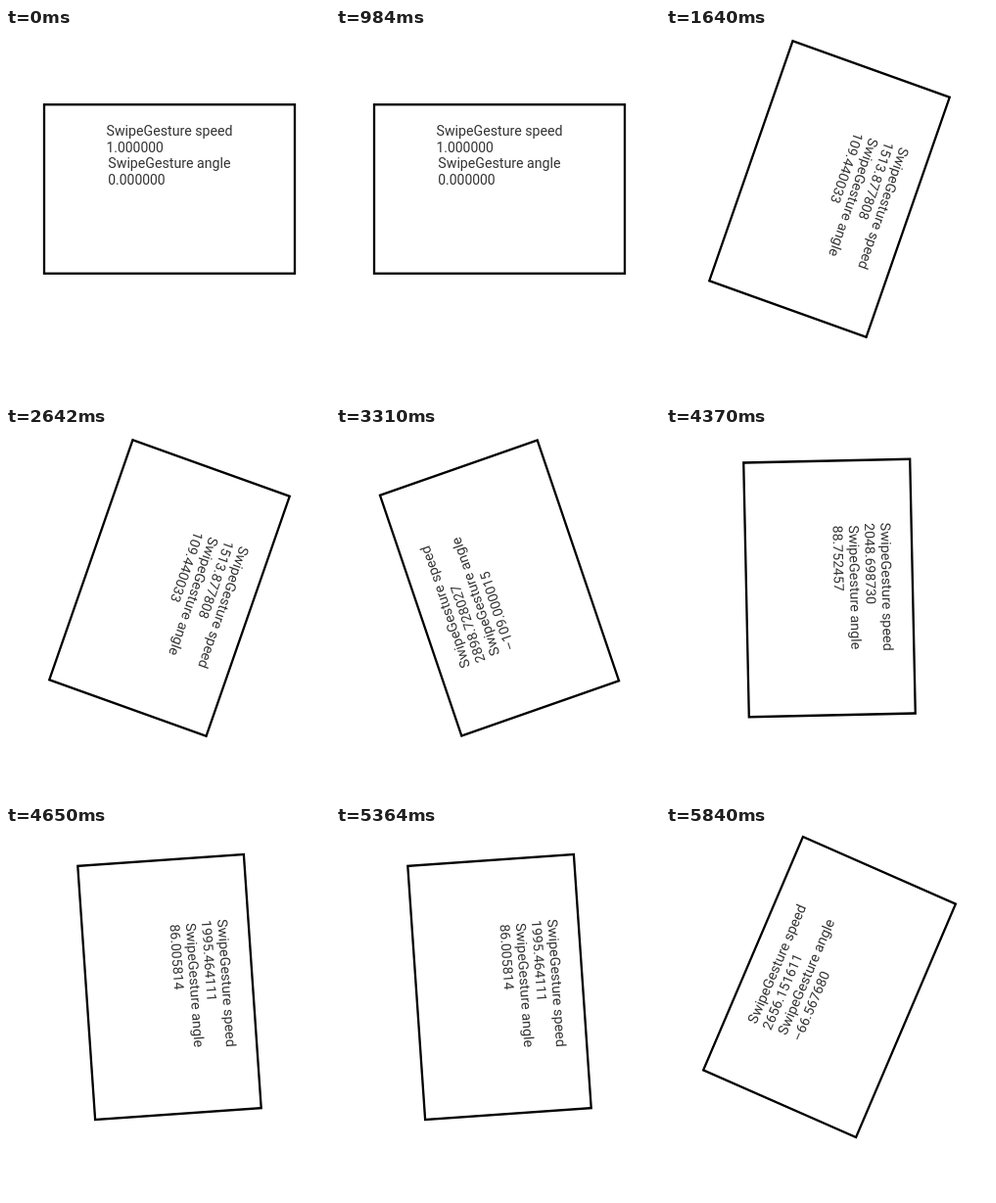
Recreate the animation shown at these times as an HTML page. Size 331 by 379 pixels, loop 6970 ms.

```html
<!DOCTYPE html>
<html>
<head>
<meta charset="utf-8">
<style>
  html, body { margin: 0; width: 100%; height: 100%; overflow: hidden; background: #fff; }
  svg { display: block; }
  text { font: 14.2px Roboto, sans-serif; fill: #333; }
  .value { font-size: 13.9px; }
  rect { fill: none; stroke: #000; stroke-width: 2.3; }
</style>
</head>
<body>
<svg width="331" height="379" viewBox="0 0 331 379">
  <g transform="translate(167 164.5) scale(1 1.015)">
    <g id="card">
      <rect x="-128" y="-85" width="256" height="170"/>
      <text x="-64.5" y="-53.7">SwipeGesture speed</text>
      <text x="-64.5" y="-37.4" id="speed" class="value"></text>
      <text x="-62.7" y="-21.1">SwipeGesture angle</text>
      <text x="-62.7" y="-4.8" id="angle" class="value"></text>
    </g>
  </g>
</svg>
<script>
const LOOP = 6970;
// start time in ms, swipe speed, swipe angle in degrees
const swipes = [
  [0, '1.000000', '0.000000'],
  [1640, '1513.877808', '109.440033'],
  [3310, '2898.728027', '-109.000015'],
  [4370, '2048.698730', '88.752457'],
  [4650, '1995.464111', '86.005814'],
  [5840, '2656.151611', '-66.567680']
];
const [card, speed, angle] = ['card', 'speed', 'angle'].map(id => document.getElementById(id));
const start = performance.now();
let shown;

function draw(now) {
  const time = Math.max(0, now - start) % LOOP;
  const swipe = swipes.findLast(([from]) => from <= time);
  if (swipe !== shown) {
    shown = swipe;
    speed.textContent = swipe[1];
    angle.textContent = swipe[2].replace('-', '–'); // wider minus sign
    card.setAttribute('transform', `rotate(${swipe[2]})`);
  }
  requestAnimationFrame(draw);
}
draw(start);
</script>
</body>
</html>
```
